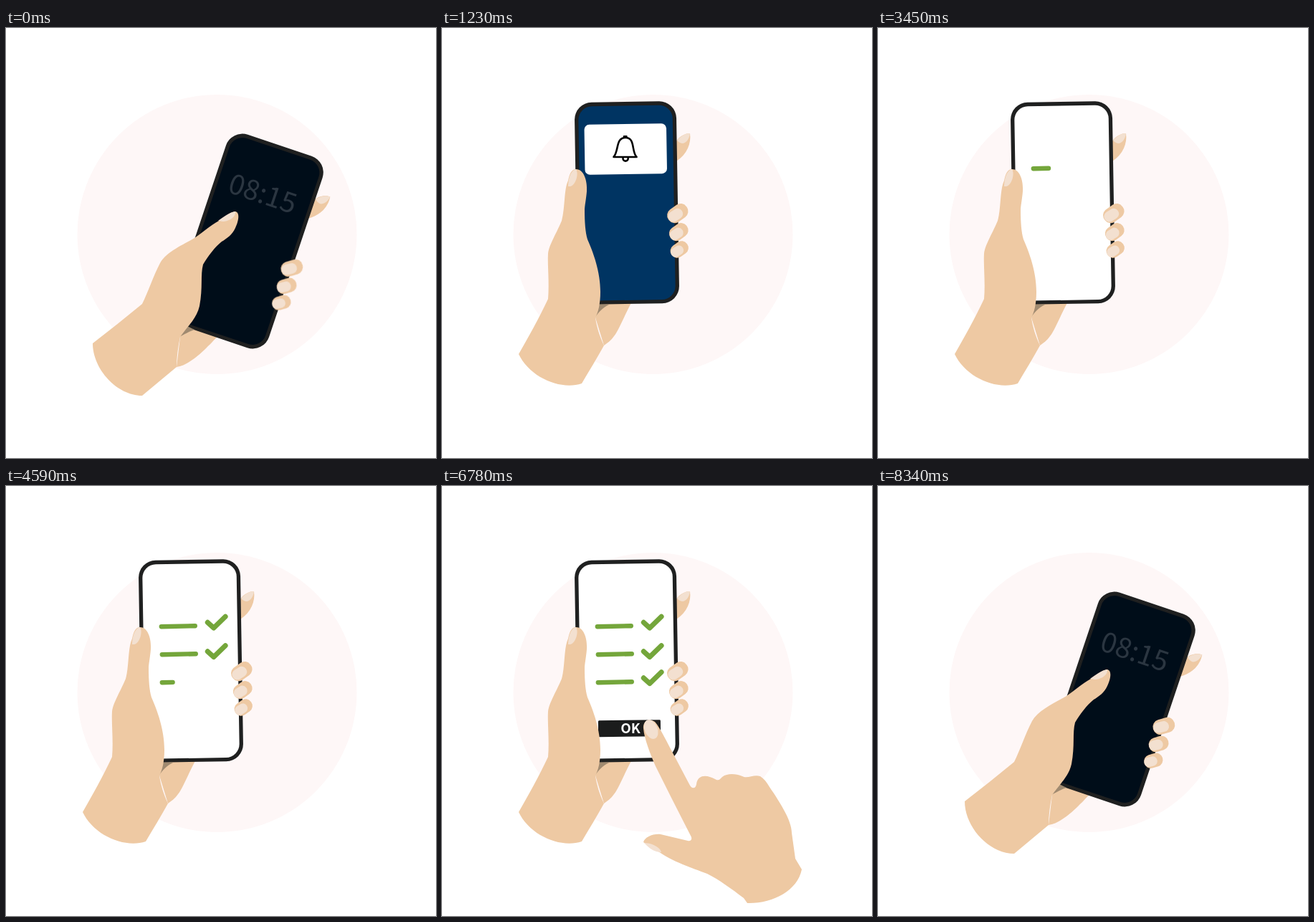
Recreate the animation shown at these times as an HTML page. Size 600x600 px, loop 8.64 s.

```html
<!DOCTYPE html>
<html lang="en">
<head>
<meta charset="utf-8">
<title>Phone check</title>
<style>
  html, body { margin: 0; width: 100%; height: 100%; overflow: hidden; background: #fff; }
  svg { display: block; width: 100vw; height: 100vh; }
  text { font-family: "Noto Sans CJK JP", "Noto Sans CJK SC", "Noto Sans", sans-serif; text-anchor: middle; }
  .skin { fill: #eec9a3; }
  .nail { fill: #f3e0d0; }
  .green { fill: none; stroke: #74a63b; stroke-linecap: round; stroke-linejoin: round; }
  .bell { fill: none; stroke: #000; stroke-width: 2.6; stroke-linejoin: round; stroke-linecap: round; }
</style>
</head>
<body>
<svg viewBox="0 0 600 600">
  <clipPath id="stage"><rect width="600" height="597"/></clipPath>
  <circle cx="294.5" cy="288" r="195" fill="#fef7f7"/>
  <path id="heel" class="skin"/>
  <g id="phone">
    <path class="skin" d="M326 159 C332 150 340 147 346 147 C348 161 342 176 327 186Z"/>
    <path class="nail" d="M328 157 C334 150 340 147 346 147 C345 155 341 160 336 161 C333 161 330 159 328 157Z"/>
    <g transform="rotate(-.95 258 244)">
      <rect x="187" y="103" width="142" height="282" rx="24" fill="#1f2020"/>
      <rect id="screen" x="192.3" y="108.4" width="131.4" height="271.4" rx="19"/>
    </g>
    <text id="clock" x="257" y="188" font-size="39" font-weight="500" fill="#2b3641" transform="rotate(-.95 258 244)">08:15</text>
    <g id="notice">
      <rect x="199" y="134" width="114.5" height="70" rx="7" fill="#fff" transform="rotate(-.95 256 169)"/>
      <path class="bell" d="M239.5 180 C247 172 242 153 256 153 C270 153 264 172 271.5 180Z M254 151.3 h3.4 M252.5 182 a3.6 3.6 0 0 0 7.2 0"/>
    </g>
    <g id="list">
      <g id="button">
        <rect x="218" y="326.7" width="87" height="23" rx="1.5" fill="#1b1c1c" transform="rotate(-.6 262 338)"/>
        <text x="263" y="345.4" font-size="19" font-weight="700" fill="#fff">OK</text>
      </g>
    </g>
    <g id="fingers"></g>
  </g>
  <path id="shade" fill="#a08a70"/>
  <path id="palm" class="skin"/>
  <path id="thumbnail" class="nail"/>
  <g clip-path="url(#stage)">
    <g id="pointer">
      <path class="skin" d="M281 338 C280 328 289 323 297 329 C305 338 314 358 326 380 L345 416
        C348 423 354 423 355 416 C357 402 370 403 381 409 C386 412 388 409 391 406
        C399 400 411 402 419 405 C426 409 435 402 444 405 C449 408 453 413 457 420
        C472 442 488 467 488 484 L493 520 L502 535 C496 565 461 583 426 582
        L421 575 C404 562 386 549 370 541 C349 533 320 523 305 512 L281 497
        C283 490 294 485 305 486 L343 495 C347 496 350 493 347 488
        L320 435 L298 391 C291 375 282 352 281 338Z"/>
      <ellipse class="nail" cx="291.8" cy="339.5" rx="9" ry="14" transform="rotate(-22 291.8 339.5)"/>
      <path class="nail" d="M282 498 C291 498 304 503 306 511 C297 511 289 506 282 498Z"/>
    </g>
  </g>
</svg>
<script>
const LOOP = 8640;
const $ = id => document.getElementById(id);
const clamp = x => Math.min(1, Math.max(0, x));
const ramp = (t, a, b) => clamp((t - a) / (b - a));
const ease = x => x * x * (3 - 2 * x);
const show = (el, o) => el.setAttribute('opacity', o);

function add(parent, tag, attrs) {
  const el = document.createElementNS('http://www.w3.org/2000/svg', tag);
  for (const k in attrs) el.setAttribute(k, attrs[k]);
  return parent.appendChild(el);
}

// Each shape: tilted pose, upright pose
const shapes = {
  heel: [
    'M243 431 L250 414 L298 427 C284 443 268 458 260 463 C253 468 246 472 238 473Z',
    'M214 404 L220 382 L266 380 C255 400 246 423 240 430 C236 436 230 440 226 443Z'],
  shade: [
    'M248 419 L251 415 L263 421 C256 423 248 428 242 431Z',
    'M216 390 L219 386 L233 386 C224 390 217 398 213 405Z'],
  palm: [
    `M320 256 C328 258 323 273 320 279 C316 288 308 294 301 298 C292 305 282 318 275 330
     C271 345 275 362 270 388 C266 405 256 413 243 431 C240 445 238 460 238 473
     C222 486 206 500 190 513 C155 513 121 476 121 440 C144 422 167 404 190 385
     C198 369 206 345 215 328 C224 312 248 302 263 293 C275 285 283 277 297 269
     C306 265 312 256 320 256Z`,
    `M187 197 C198 197 203 213 202 228 C201 240 199 248 199 255 C199 270 200 285 203 295
     C211 313 221 340 221 368 C221 385 218 397 214 404 C216 418 220 430 226 443
     C216 461 205 479 195 496 C165 506 122 487 107 455 C120 432 136 404 148 378
     C150 355 147 330 148 315 C149 303 161 284 167 269 C172 250 170 225 176 213
     C178 203 181 197 187 197Z`],
  thumbnail: [
    'M296 269 C303 264 312 257 320 256 C321 264 311 270 302 270Z',
    'M176 221 C176 210 180 198 187 197 C191 203 187 219 179 221Z']
};

function morph([from, to], p) {
  const ends = to.match(/\d+/g);
  let i = 0;
  return from.replace(/\d+/g, n => (+n + (ends[i++] - n) * p).toFixed(2));
}

function pill(cls, x, y, w, h, turn) {
  add($('fingers'), 'rect', { class: cls, x: x - w / 2, y: y - h / 2, width: w, height: h,
    rx: h * .48, transform: `rotate(${turn} ${x} ${y})` });
}
for (const [x, y, w, h] of [[328.8, 258.6, 31, 21], [330.3, 284.6, 28, 20], [331.2, 309, 26.5, 19]]) {
  pill('skin', x, y, w, h, -36);
  pill('nail', x - 3, y + 2.6, w * .7, h * .7, -33);
}

// Lines and ticks draw themselves one after the other
const strokes = [];
[[216.8, 196.2, 0], [217.8, 235.2, 40.5], [217.8, 274.2, 77.5]].forEach(([x, y, drop]) => {
  const line = `M${x} ${y} l47 -1`;
  const tick = `M281.3 ${190.3 + drop} l8.6 7.8 l16.2 -15.8`;
  [[line, 6.4], [tick, 7]].forEach(([d, width]) =>
    strokes.push(add($('list'), 'path', { class: 'green', d, 'stroke-width': width, pathLength: 1 })));
});

function glow(t) {
  if (t > 7000) return .25;
  const wake = ease(ramp(t, 600, 960));
  const pulse = t > 1230 ? .09 * (1 - Math.cos((t - 1230) / 1100 * 2 * Math.PI)) : 0;
  return .25 + .75 * wake - pulse;
}

function draw(t) {
  const up = ease(ramp(t, 60, 480)) - ease(ramp(t, 7920, 8340));
  const tilt = 1 - up;
  for (const id in shapes) $(id).setAttribute('d', morph(shapes[id], up));
  $('phone').setAttribute('transform',
    `translate(${79 * tilt} ${53.5 * tilt}) rotate(${19.5 * tilt} 258 244)`);

  const white = t < 3240 ? 0 : 1 - ramp(t, 7860, 8040);
  const k = glow(t);
  const mix = c => Math.round(c * k + (255 - c * k) * white);
  $('screen').setAttribute('fill', `rgb(${mix(0)},${mix(52)},${mix(98)})`);
  show($('clock'), t < 3240 ? 1 - ramp(t, 600, 780) : 1 - white);
  show($('notice'), t < 3240 ? ramp(t, 660, 960) : 0);
  show($('list'), white);
  show($('button'), ramp(t, 5010, 5220));

  strokes.forEach((s, i) => {
    const p = ramp(t, 3318 + i * 295, 3613 + i * 295);
    s.setAttribute('stroke-dasharray', `${p} 2`);
    show(s, p > 0 ? 1 : 0);
  });

  const away = 1 - ramp(t, 5220, 5850) + 1.5 * ramp(t, 7560, 7950);
  $('pointer').setAttribute('transform',
    `translate(${81.6 * away} ${117.5 * away}) scale(${1 - .088 * away})`);
  show($('pointer'), ramp(t, 5250, 5600) * (1 - ramp(t, 7590, 7950)));
}

const start = performance.now();
function tick(now) {
  draw(Math.max(0, now - start) % LOOP);
  requestAnimationFrame(tick);
}
draw(0);
requestAnimationFrame(tick);
</script>
</body>
</html>
```
